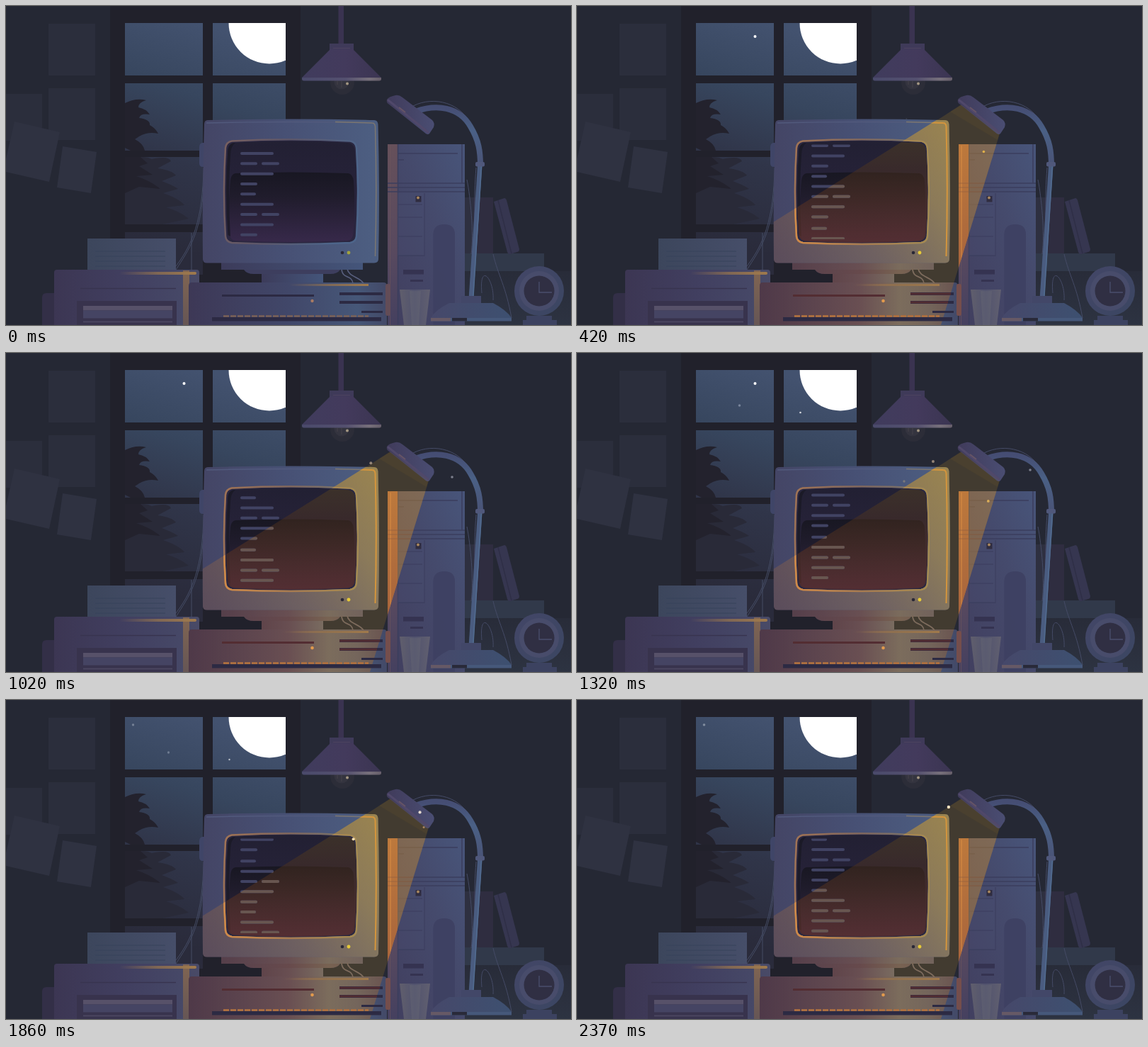
Recreate the animation shown at these times as an HTML page. Size 798x450 px, loop 2.4 s.

```html
<!DOCTYPE html>
<html lang="en">
<head>
<meta charset="utf-8">
<title>Night desk</title>
<style>
  html, body { margin: 0; width: 100%; height: 100%; overflow: hidden; background: #252834; }
  svg { display: block; width: 100%; height: 100%; }
</style>
</head>
<body>
<svg viewBox="0 0 798 450" xmlns="http://www.w3.org/2000/svg">
  <defs>
    <linearGradient id="sky" x1="168" y1="320" x2="260" y2="20" gradientUnits="userSpaceOnUse">
      <stop offset="0" stop-color="#2a2b3b"/><stop offset=".38" stop-color="#303549"/>
      <stop offset=".68" stop-color="#37465e"/><stop offset="1" stop-color="#43526f"/>
    </linearGradient>
    <linearGradient id="shade"><stop offset="0" stop-color="#403c5d"/><stop offset=".55" stop-color="#433a5c"/><stop offset="1" stop-color="#3b3552"/></linearGradient>
    <linearGradient id="rim"><stop offset="0" stop-color="#4a4a6b"/><stop offset=".55" stop-color="#54506f"/><stop offset=".85" stop-color="#77707b"/><stop offset="1" stop-color="#665e6a"/></linearGradient>
    <linearGradient id="case"><stop offset="0" stop-color="#444565"/><stop offset=".45" stop-color="#475074"/><stop offset="1" stop-color="#4d5f82"/></linearGradient>
    <linearGradient id="stand"><stop offset="0" stop-color="#3c3b5a"/><stop offset="1" stop-color="#44557a"/></linearGradient>
    <linearGradient id="pc"><stop offset="0" stop-color="#3d3856"/><stop offset=".5" stop-color="#414769"/><stop offset=".85" stop-color="#465778"/><stop offset="1" stop-color="#434967"/></linearGradient>
    <linearGradient id="printer"><stop offset="0" stop-color="#3c3653"/><stop offset=".5" stop-color="#413f60"/><stop offset=".88" stop-color="#464867"/><stop offset="1" stop-color="#494a66"/></linearGradient>
    <linearGradient id="paper"><stop offset="0" stop-color="#3c465c"/><stop offset="1" stop-color="#464e69"/></linearGradient>
    <linearGradient id="tower" x1="0" y1="1" x2="1" y2="0"><stop offset="0" stop-color="#413e5e"/><stop offset=".6" stop-color="#454a6c"/><stop offset="1" stop-color="#48557a"/></linearGradient>
    <linearGradient id="stripe" x2="0" y2="1"><stop offset="0" stop-color="#66505a"/><stop offset=".6" stop-color="#58495f"/><stop offset="1" stop-color="#45405f"/></linearGradient>
    <linearGradient id="gold"><stop offset="0" stop-color="#8e6f50" stop-opacity="0"/><stop offset=".5" stop-color="#8e6f50" stop-opacity=".8"/><stop offset="1" stop-color="#a07a4c"/></linearGradient>
    <linearGradient id="goldV" x2="0" y2="1"><stop offset="0" stop-color="#806552"/><stop offset="1" stop-color="#665655"/></linearGradient>
    <linearGradient id="bezel" y2=".25"><stop offset="0" stop-color="#79605f"/><stop offset=".45" stop-color="#5d5668"/><stop offset="1" stop-color="#4d658a"/></linearGradient>
    <linearGradient id="glass" x2="0" y2="1"><stop offset="0" stop-color="#222033"/><stop offset="1" stop-color="#2c2540"/></linearGradient>
    <linearGradient id="reflect" x2="0" y2="1"><stop offset="0" stop-color="#181722"/><stop offset=".35" stop-color="#201c2c"/><stop offset="1" stop-color="#37294a"/></linearGradient>
    <linearGradient id="arm" x2="0" y2="1"><stop offset="0" stop-color="#454d73"/><stop offset=".4" stop-color="#4a6085"/><stop offset="1" stop-color="#4a5376"/></linearGradient>
    <linearGradient id="head"><stop offset="0" stop-color="#403b5b"/><stop offset="1" stop-color="#4a4d72"/></linearGradient>
    <linearGradient id="foot"><stop offset="0" stop-color="#46486a"/><stop offset="1" stop-color="#3d5070"/></linearGradient>
    <linearGradient id="clock" x2="1" y2="1"><stop offset="0" stop-color="#434667"/><stop offset="1" stop-color="#3b4662"/></linearGradient>
    <linearGradient id="slab" x2="0" y2="1"><stop offset="0" stop-color="#2a2e3c"/><stop offset="1" stop-color="#323a4a"/></linearGradient>
    <linearGradient id="cup"><stop offset="0" stop-color="#6a6870"/><stop offset=".5" stop-color="#565871"/><stop offset="1" stop-color="#6a6873"/></linearGradient>

    <linearGradient id="warm" x1="530" y1="165" x2="290" y2="360" gradientUnits="userSpaceOnUse">
      <stop offset="0" stop-color="#dca526" stop-opacity=".54"/><stop offset=".3" stop-color="#d09a30" stop-opacity=".48"/>
      <stop offset=".65" stop-color="#a47442" stop-opacity=".42"/><stop offset="1" stop-color="#865b48" stop-opacity=".36"/>
    </linearGradient>
    <linearGradient id="warmPc" x1="258" x2="540" gradientUnits="userSpaceOnUse">
      <stop offset="0" stop-color="#693a34" stop-opacity=".4"/><stop offset=".5" stop-color="#9a5836" stop-opacity=".45"/>
      <stop offset=".7" stop-color="#b88b45" stop-opacity=".48"/><stop offset="1" stop-color="#8f5c36" stop-opacity=".5"/>
    </linearGradient>
    <linearGradient id="warmGlass" x2="0" y2="1">
      <stop offset="0" stop-color="#614a1c" stop-opacity=".4"/><stop offset=".3" stop-color="#53341b" stop-opacity=".42"/>
      <stop offset="1" stop-color="#5e302a" stop-opacity=".72"/>
    </linearGradient>
    <linearGradient id="warmEdge"><stop offset="0" stop-color="#d08a48"/><stop offset=".5" stop-color="#a87b50"/><stop offset="1" stop-color="#a58a50"/></linearGradient>
    <linearGradient id="warmStripe" x2="0" y2="1"><stop offset="0" stop-color="#bd793c"/><stop offset="1" stop-color="#a5613c"/></linearGradient>

    <clipPath id="panes"><path d="M168 24h110v74H168zM292 24h103v74H292zM168 109h110v95H168zM292 109h103v95H292zM168 213h110v95H168zM292 213h103v95H292zM168 319h110v60H168z"/></clipPath>
    <clipPath id="beam"><path d="M543 139L597 180L514 450H45Z"/></clipPath>
    <clipPath id="codeArea"><rect x="313" y="195.5" width="180" height="133.5"/></clipPath>
    <path id="body" d="M285 161Q402 158 520 161Q525 161 525.5 167Q528 265 526 357Q526 362 520 362.500H284Q278 362.500 278 357Q277 262 280 167Q280 161 285 161Z"/>
    <path id="screen" d="M322 193Q402 188 483 193Q491 194 492.500 202Q498 264 492.500 323Q491 330.500 483 331.500Q402 336 322 331.500Q315 330.500 313.500 323Q308 264 313.500 202Q314.500 194 322 193Z"/>
    <path id="frame" d="M319 190.500Q402 186 486 190.500Q494 192 495 200Q499 264 495 325Q494 333 486 334Q402 338 319 334Q311 333 310 325Q306 264 310 200Q311 192 319 190.500Z"/>
    <path id="pcBody" d="M262 390H533Q538 390 538 395V450H258V395Q258 390 262 390Z"/>
  </defs>

  <rect width="798" height="450" fill="#252834"/>

  <!-- wall notes -->
  <g fill="#2b2e3c">
    <rect x="60" y="25" width="66" height="73"/>
    <rect x="60" y="116" width="66" height="73"/>
    <rect x="0" y="124" width="51" height="66"/>
    <path d="M12 163L76 178L61 248L-4 233Z" fill="#2f3241"/>
    <path d="M80 198L128 206L120 264L72 256Z" fill="#2f3241"/>
  </g>

  <!-- window -->
  <rect x="147" width="269" height="450" fill="#21212b"/>
  <g clip-path="url(#panes)">
    <rect x="160" y="20" width="240" height="380" fill="url(#sky)"/>
    <circle cx="372" cy="24" r="57.500" fill="#fff"/>
    <path fill="#292a38" d="M168 222Q190 208 206 216Q230 211 233 219L214 229Q235 232 240 239L220 247Q236 253 243 258L222 264Q245 272 252 281L226 284Q246 290 258 300L220 308H168Z"/>
    <path fill="#23222d" d="M168 137Q184 129 198 133Q187 136 187 143Q198 145 203 153Q190 151 188 158Q204 160 203 168Q211 172 215 180Q200 177 188 184L182 188Q194 194 196 204H176L168 200ZM190 213L200 222L188 226L207 238L184 240Q205 247 218 258L188 255L168 264V213Z"/>
  </g>
  <path d="M278 320V390H292V320" fill="#21212b"/>

  <!-- hanging lamp -->
  <circle cx="475" cy="108" r="17" fill="#2c2d38"/>
  <circle cx="474" cy="107" r="10.500" fill="#34343f"/>
  <rect x="469.500" width="7.500" height="54" fill="#3a3350"/>
  <path d="M457 53H491V62L530 101H418L457 62Z" fill="url(#shade)"/>
  <rect x="457" y="53" width="34" height="8" fill="#3f3a59"/>
  <path d="M462 59.500H486" stroke="#4d4260"/>
  <path d="M418 101H530V103Q530 105.500 527 105.500H421Q418 105.500 418 103Z" fill="url(#rim)"/>
  <path d="M468 106V111M474 106V115" stroke="#44414b"/>
  <circle cx="482" cy="109.500" r="2" fill="#a39682"/>

  <!-- books, shelf, clock -->
  <rect x="648" y="270" width="40" height="80" fill="#2f2d40"/>
  <path d="M648 270H660V350H648Z" fill="#2e3040"/>
  <rect x="648" y="374" width="150" height="76" fill="url(#slab)" opacity=".6"/>
  <rect x="648" y="349" width="112" height="25" fill="#31394a"/>
  <path d="M689 276L704 271Q706 271 707 274L725 343Q725 346 722 347L712 350Q709 350 708 347Z" fill="#363650"/>
  <path d="M695 274L714 349" stroke="#2f2f46" stroke-width="1.500"/>
  <path d="M735 437H771V443H778V450H730V443H735Z" fill="#3c4260"/>
  <circle cx="753" cy="402" r="35" fill="url(#clock)"/>
  <circle cx="753" cy="402" r="28" fill="#484c6b"/>
  <circle cx="753" cy="402" r="21.500" fill="#302f43"/>
  <path d="M753 389V404H771" fill="none" stroke="#4a4f6d" stroke-width="1.300"/>

  <!-- tower -->
  <rect x="539" y="195" width="109" height="255" fill="url(#tower)"/>
  <rect x="539" y="195" width="14" height="255" fill="url(#stripe)"/>
  <path d="M542.500 197V450" stroke="#6e565c" opacity=".6"/>
  <g fill="none" stroke="#3b3e5d" stroke-width="1.500">
    <path d="M553.500 195V450M553 208H638M554 217H562M539 250H648M539 256H648M539 262H648M553 280H588M553 298H588M553 325H588M553 352H591V264M644 195V250"/>
  </g>
  <rect x="553" y="264" width="39" height="88" fill="#4c5375" opacity=".2"/>
  <rect x="578.500" y="268" width="8" height="8.500" fill="#302d40"/>
  <circle cx="582" cy="270.500" r="2" fill="#a8875e"/>
  <path d="M603.500 450V323Q603.500 308 619 308Q634 308 634 323V450Z" fill="#40426480"/>
  <path d="M603.500 450V323Q603.500 308 619 308Q634 308 634 323V450Z" fill="#3e4062" opacity=".8"/>
  <rect x="561" y="372" width="29" height="6.500" fill="#353351"/>
  <rect x="571" y="386" width="18" height="3" fill="#353351"/>

  <g class="lit">
    <path d="M543 139L597 180L514 450H448V200Z" fill="#d89c1e" opacity=".16"/>
    <g clip-path="url(#beam)">
      <rect x="539" y="195" width="109" height="255" fill="#c98a3a" opacity=".3"/>
      <rect x="539" y="195" width="14" height="200" fill="url(#warmStripe)"/>
      <path d="M543 197V390" stroke="#d98d45"/>
      <path d="M539 250H580M539 256H580M539 262H580" stroke="#8c5c40" opacity=".6"/>
    </g>
  </g>

  <!-- desk lamp -->
  <g fill="none">
    <path d="M575 141C605 126 645 137 657 170M664 228C660 275 664 300 660 350M672 405C668 360 690 385 688 415M651 245C656 270 661 320 657 350M688 350C695 380 706 395 714 440" stroke="#454b66" stroke-width="1"/>
    <path d="M578 149C608 138 640 142 656 170C668 190 670 205 670 226" stroke="url(#arm)" stroke-width="8"/>
    <path d="M669.500 222L657 410" stroke="#4a5c80" stroke-width="6.500"/>
    <path d="M671.500 226L660 409" stroke="#526d91" stroke-width="1.500"/>
  </g>
  <rect x="663" y="220" width="13" height="6.500" rx="2" fill="#50587b"/>
  <rect x="643" y="409" width="28" height="10" fill="#424768"/>
  <path d="M626 419H688Q707 429 714 440H600Q606 429 626 419Z" fill="url(#foot)"/>
  <rect x="600" y="440" width="114" height="4.500" fill="#46587a"/>
  <rect x="600" y="440" width="28" height="4.500" fill="#665965"/>
  <rect x="630" y="440" width="21" height="4.500" fill="#292a39"/>
  <path d="M538 132Q540 128 550 126Q555 125 560 129L602 161Q606 165 604 171L598 180Q596 182 593 180L540 138Q537 136 538 132Z" fill="url(#head)"/>
  <path d="M540 133L596 178" stroke="#50486a" stroke-width="3" stroke-linecap="round"/>
  <path d="M555 143L564 150" stroke="#665465" stroke-width="2"/>

  <path d="M556 400H599L593 450H562Z" fill="url(#cup)" opacity=".75"/>
  <path d="M570 402H586L583 450H573Z" fill="#7b7a7d" opacity=".22"/>

  <!-- cables and printer -->
  <g fill="none" stroke="#454c65">
    <path d="M279 228C278 300 264 338 236 372M279 255C276 320 258 344 240 372M262 320V372"/>
  </g>
  <path d="M51 450V411Q51 405 57 405H70V450Z" fill="#332f47"/>
  <rect x="115" y="328" width="125" height="45" fill="url(#paper)"/>
  <path d="M126 346H225M126 353H225M126 360H225M126 367H225" stroke="#37425a"/>
  <path d="M72 372H269Q273 372 273 376V450H68V376Q68 372 72 372Z" fill="url(#printer)"/>
  <rect x="250" y="373" width="9" height="77" fill="url(#goldV)"/>
  <rect x="160" y="375" width="109" height="4" rx="2" fill="url(#gold)"/>
  <path d="M105 398.500H240" stroke="#38344f" stroke-width="1.500"/>
  <rect x="100" y="416" width="141" height="34" fill="#38334d"/>
  <rect x="109" y="423" width="126" height="6.500" fill="#575169"/>
  <rect x="109" y="429.500" width="126" height="11" fill="#454463"/>
  <path d="M109 445.500H235" stroke="#4b4761" stroke-width="2"/>

  <!-- desktop case and stand -->
  <use href="#pcBody" fill="url(#pc)"/>
  <rect x="536" y="392" width="7" height="45" rx="3" fill="#634c57"/>
  <rect x="400" y="392" width="112" height="3" fill="url(#gold)"/>
  <path d="M474 371C475 386 488 378 490 391M482 371C484 382 499 382 505 391" fill="none" stroke="#59607f" stroke-width="1.500"/>
  <rect x="361" y="377" width="87" height="13" fill="url(#stand)"/>
  <path d="M336 372H472Q468 378 458 378H350Q340 378 336 372Z" fill="#3d3e5e"/>
  <rect x="304" y="362" width="200" height="10" fill="url(#stand)"/>
  <g class="lit" clip-path="url(#beam)">
    <use href="#pcBody" fill="url(#warmPc)"/>
    <rect x="304" y="362" width="200" height="10" fill="url(#warmPc)"/>
    <path d="M336 372H472Q468 378 458 378H448V390H361V378H350Q340 378 336 372Z" fill="url(#warmPc)"/>
    <rect x="390" y="392" width="122" height="3" fill="url(#gold)"/>
    <path d="M474 371C475 386 488 378 490 391M482 371C484 382 499 382 505 391" fill="none" stroke="#806b55" stroke-width="1.500"/>
  </g>
  <rect class="lit" x="536" y="392" width="7" height="45" rx="3" fill="#825045" opacity=".6"/>
  <g id="slots" fill="#2c2a43">
    <rect x="305" y="407" width="130" height="3"/>
    <rect x="471" y="404" width="61" height="4"/>
    <rect x="471" y="416" width="61" height="4"/>
    <rect x="502" y="430" width="30" height="3"/>
    <rect x="291" y="439" width="239" height="5.500"/>
  </g>
  <path class="lit" d="M305 408.500H435M471 406H528M471 418H524" stroke="#532d32" stroke-width="3"/>
  <path d="M307 437.500H512" stroke="#7b6157" stroke-width="2.500" stroke-dasharray="8 2"/>
  <path class="lit" d="M307 437.500H512" stroke="#b3713e" stroke-width="2.500" stroke-dasharray="8 2"/>
  <circle cx="432.500" cy="416" r="2.200" fill="#a87b64"/>
  <circle class="lit" cx="432.500" cy="416" r="2.200" fill="#e29a4c"/>

  <!-- monitor -->
  <path d="M281 193H277Q273 194 273 199V222Q273 227 278 227H281Z" fill="#3f4567"/>
  <use href="#body" fill="url(#case)"/>
  <path d="M283 165Q402 162 519 165" fill="none" stroke="#525a7d" stroke-width="1.500"/>
  <path d="M465 163.500L517 165Q521 165 521.500 170Q524 260 521.500 353" fill="none" stroke="#7c7771" stroke-width="1.500"/>
  <g class="lit" clip-path="url(#beam)">
    <use href="#body" fill="url(#warm)"/>
    <path d="M465 163.500L517 165Q521 165 521.500 170Q524 260 521.500 353" fill="none" stroke="#d4953d" stroke-width="2"/>
  </g>
  <use href="#frame" fill="#2a2740" stroke="url(#bezel)" stroke-width="2.500"/>
  <g class="lit">
    <use href="#frame" fill="none" stroke="url(#warmEdge)" stroke-width="2.500" opacity=".45"/>
    <g clip-path="url(#beam)"><use href="#frame" fill="none" stroke="url(#warmEdge)" stroke-width="2.500"/></g>
  </g>
  <use href="#screen" fill="url(#glass)"/>
  <path d="M324 236Q402 233 483 236Q490 237 491 247Q494 290 490 323Q489 330 482 331Q402 335 324 331Q317 330 316 323Q313 285 317 246Q318 237 324 236Z" fill="url(#reflect)"/>
  <path d="M313.500 323Q309 264 313.500 202Q315 193 324 193Q317 198 317 210Q313 266 317 325Z" fill="#191823" opacity=".75"/>
  <g class="lit" clip-path="url(#beam)"><use href="#screen" fill="url(#warmGlass)"/></g>
  <g clip-path="url(#codeArea)">
    <g id="code" stroke="#414363" stroke-width="4" stroke-linecap="round"></g>
    <g class="lit" clip-path="url(#beam)"><use href="#code" id="warmCode"/></g>
  </g>
  <circle cx="475" cy="348" r="2.300" fill="#292736"/>
  <circle cx="484" cy="348" r="2.400" fill="#a2a33e"/>
  <circle class="lit" cx="484" cy="348" r="2.400" fill="#e6c83a"/>

  <!-- light passing in front of the lamp -->
  <path class="lit" d="M543 139L597 180L594 189L527 149Z" fill="#d89c1e" opacity=".05"/>
  <g id="dots"></g>
</svg>
<script>
const LOOP = 2400;
const NS = 'http://www.w3.org/2000/svg';
const $ = id => document.getElementById(id);
const lit = [...document.querySelectorAll('.lit')];

function add(parent, tag, attrs = {}) {
  const el = document.createElementNS(NS, tag);
  for (const k in attrs) el.setAttribute(k, attrs[k]);
  return parent.appendChild(el);
}

// Code rows: a five row pattern of bar extents
const ROWS = ['M333 0H376', 'M333 0H353M363 0H384', 'M333 0H376', 'M333 0H353', 'M333 0H351'];
const rowY = i => 208 + 14.35 * i + (i > 8 ? 1.8 : 0);
for (let i = 0; i < 19; i++) {
  add($('code'), 'path', { d: ROWS[i % 5], transform: `translate(0 ${rowY(i)})` });
}
// Warm copy of the rows, tinted where the lamp reaches
const warm = $('code').cloneNode(true);
warm.id = 'codeWarm';
warm.setAttribute('stroke', '#685650');
$('warmCode').replaceWith(warm);

// x, y, radius, colour, opacity, start, end
const stars = [
  [251.5, 43, 2, '#fff', 1, 210, 1500],
  [229.5, 74, 1.8, '#9aa5b8', .65, 1120, 1960],
  [315.5, 84, 1.3, '#fff', .8, 1120, 1960],
  [179.5, 35, 1.8, '#a4adbb', .65, 1760, 2800]
];
// two timed points, radius, colour, opacity, start, end
const dust = [
  [240, 568, 224, 690, 584, 178, 1.8, '#e0b04a', 1, 60, 860],
  [240, 469, 162, 540, 463, 157, 1.5, '#7c7f92', .7, 90, 460],
  [690, 529, 158, 1320, 503, 153, 2, '#a99584', .85, 520, 1480],
  [690, 619, 186, 1320, 640, 165, 1.8, '#8d8f9e', .85, 500, 1450],
  [1320, 462, 181, 1620, 456, 196, 1.7, '#84817b', .8, 1080, 1500],
  [1320, 581, 209, 1620, 538, 174, 1.9, '#e2b25a', .95, 1160, 1840],
  [1620, 518, 200, 2070, 467, 193, 2.1, '#f3dcb0', 1, 1440, 2180],
  [1620, 606, 159, 2070, 566, 158, 2.1, '#eee3d6', .95, 1460, 2070],
  [1620, 612, 187, 2070, 571, 173, 1.5, '#b9926a', .85, 1480, 2150],
  [2070, 566, 158, 2370, 525, 151, 2.2, '#f6e2c0', 1, 2070, 2700]
];
const starDots = stars.map(([cx, cy, , fill]) => add($('dots'), 'circle', { cx, cy, fill }));
const dustDots = dust.map(d => add($('dots'), 'circle', { fill: d[7] }));

const clamp = v => Math.max(0, Math.min(1, v));
const fade = (t, a, b) => clamp((t - a) / 120) * clamp((b - t) / 120);

function show(el, r, alpha, t, a, b, hold) {
  const f = hold && t >= a ? 1 : fade(t, a, b);
  el.setAttribute('r', r * (.5 + .5 * f));
  el.setAttribute('opacity', alpha * f);
}

function draw(t) {
  const on = t >= 60 && !(t >= 1200 && t < 1260);
  for (const el of lit) el.style.display = on ? '' : 'none';

  const shift = `translate(0 ${-144 * t / LOOP})`;
  $('code').setAttribute('transform', shift);
  warm.setAttribute('transform', shift);

  stars.forEach(([, , r, , alpha, a, b], i) => show(starDots[i], r, alpha, t, a, b));
  dust.forEach(([ta, xa, ya, tb, xb, yb, r, , alpha, a, b], i) => {
    const k = (t - ta) / (tb - ta);
    dustDots[i].setAttribute('cx', xa + (xb - xa) * k);
    dustDots[i].setAttribute('cy', ya + (yb - ya) * k);
    const joined = a === ta;
    show(dustDots[i], r, b === ta + 450 && t >= b ? 0 : alpha, t, a, b, joined);
  });
}

function tick(now) {
  draw(now % LOOP);
  requestAnimationFrame(tick);
}
draw(0);
requestAnimationFrame(tick);
</script>
</body>
</html>
```
